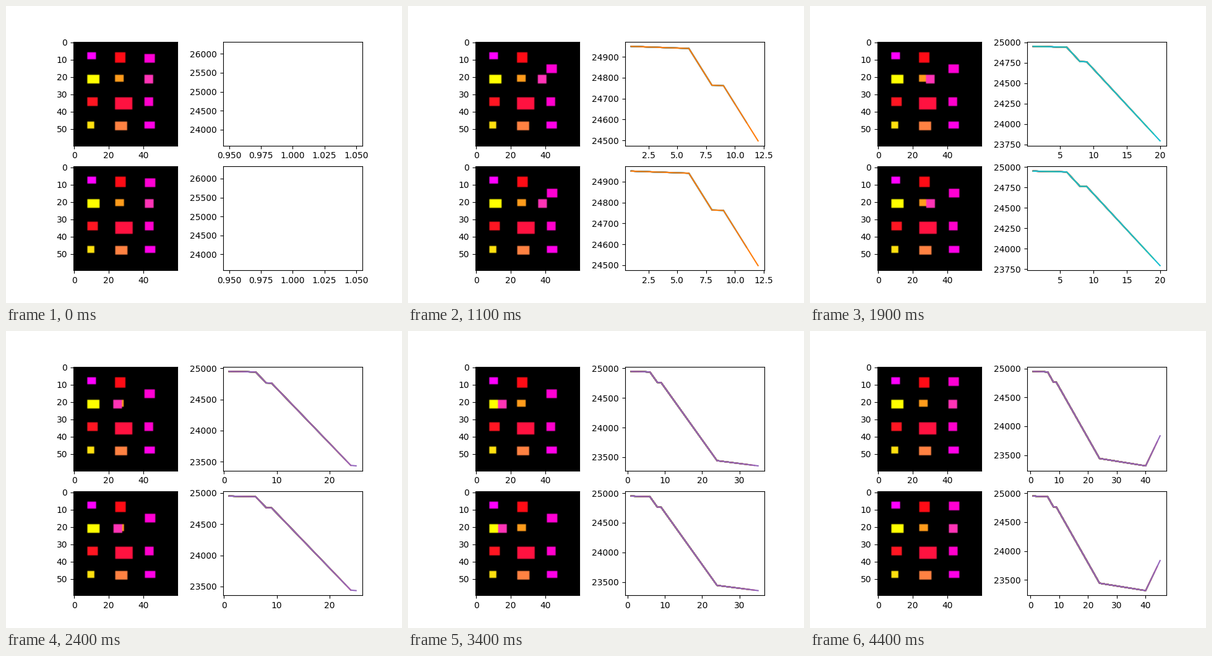
These frames come from a looping animation (640 by 480 pixels, 4500 ms). A matplotlib script:

```python
from itertools import product

import numpy as np
import matplotlib.pyplot as plt
from matplotlib.animation import FuncAnimation
from matplotlib.colors import to_rgb

STEPS = 45
SIZE = 60
COLS = (8, 24, 41)
ROWS = (6, 19, 32, 46)

# width, height, colour of each block, row by row
BLOCKS = [
    (5, 4, "magenta"), (6, 6, "#ff0c16"), (6, 5, "#ff00d4"),
    (7, 5, "yellow"), (5, 4, "#ff9c1c"), (5, 5, "#ff34b6"),
    (6, 5, "#ff1622"), (10, 7, "#ff1240"), (5, 5, "#ff00cc"),
    (4, 4, "#ffe10f"), (7, 5, "#ff8242"), (6, 4, "#ff00e8"),
]
FALLING, SLIDING = (6, 41), (19, 41)

START_COST = 24950
FALL_GAIN = 2
FLOW = (56, 40, 8)  # pull of each column on the sliding block


def moves(step):
    """Cells moved down by one block and left by the other."""
    down = min(step, 6) + (step > 8)
    return down, step - down


def cost(step):
    """Flow times distance, summed over the columns."""
    down, left = moves(step)
    home = SLIDING[1]
    travel = sum(flow * (abs(home - left - col) - abs(home - col))
                 for flow, col in zip(FLOW, COLS))
    return START_COST - FALL_GAIN * (down - 1) + travel


def scene(step):
    img = np.zeros((SIZE, SIZE, 3))
    down, left = moves(step % STEPS)  # the last step resets the layout
    for (row, col), (w, h, color) in zip(product(ROWS, COLS), BLOCKS):
        y = row + down * ((row, col) == FALLING)
        x = col - left * ((row, col) == SLIDING)
        img[y:y + h, x:x + w] = to_rgb(color)
    return img


steps = np.arange(1, STEPS + 1)
costs = [cost(s) for s in steps]

fig, axes = plt.subplots(2, 2, figsize=(6.4, 4.8), dpi=100)
images = [ax.imshow(scene(1)) for ax in axes[:, 0]]
# each step adds a longer curve in the next cycle colour
curves = [[ax.plot(steps[:n], costs[:n])[0] for n in steps]
          for ax in axes[:, 1]]


def update(i):
    img = scene(i + 1)
    for image in images:
        image.set_data(img)
    for ax, lines in zip(axes[:, 1], curves):
        for k, line in enumerate(lines):
            line.set_visible(k <= i)
        ax.relim(visible_only=True)
        ax.autoscale_view()
    return []


anim = FuncAnimation(fig, update, frames=STEPS, interval=100,
                     init_func=lambda: update(0), repeat=True, blit=False)
plt.show()
```
